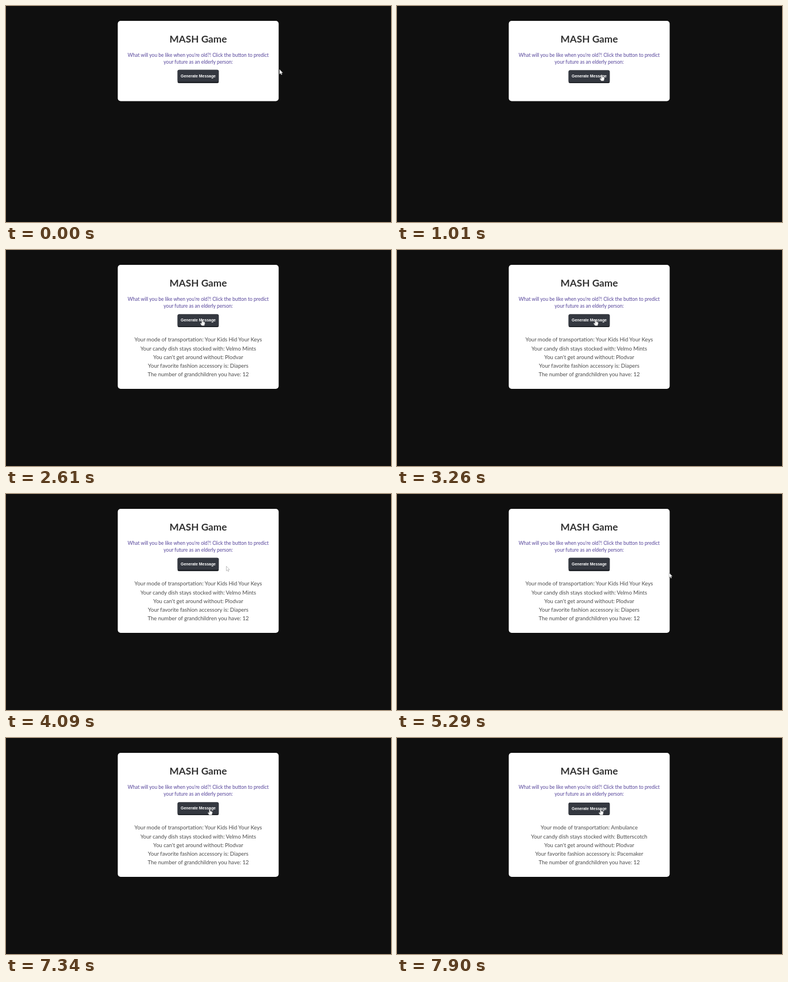
Write an HTML page that moves like this. It is 670 px wide and 378 px high and loops after 8 s.

```html
<!DOCTYPE html>
<html lang="en">
<head>
<meta charset="utf-8">
<title>MASH Game</title>
<style>
  html, body { margin: 0; width: 100%; height: 100%; overflow: hidden; background: #0f0f0f; }
  svg { display: block; width: 100vw; height: 100vh; }
  text { text-anchor: middle; font-family: Lato, "Open Sans", sans-serif; }
  .title { font-size: 17.2px; font-weight: 700; fill: #333; }
  .intro { font-size: 8.53px; fill: #55449a; }
  .result { font-size: 9.5px; fill: #4c4c4c; }
  .label { font: 700 6.9px "Liberation Sans", Arial, sans-serif; fill: #fff; }
  .pointer { fill: #fff; stroke: #999; stroke-width: .6; stroke-linejoin: round; }
</style>
</head>
<body>
<svg viewBox="0 0 670 378">
  <rect id="card" x="194.5" y="26" width="280" rx="5" fill="#fff"/>
  <text class="title" x="334.5" y="64.4">MASH Game</text>
  <text class="intro" x="334.5" y="89.4">What will you be like when you're old?! Click the button to predict</text>
  <text class="intro" x="334.5" y="101">your future as an elderly person:</text>
  <rect id="edge" x="298.6" width="71.6" rx="2.5" fill="#212429"/>
  <rect id="face" x="298.6" width="71.6" rx="2.5" fill="#343840"/>
  <text id="label" class="label" x="334.5">Generate Message</text>
  <g id="results"></g>
  <path id="arrow" class="pointer" d="M0 0V8.2L1.9 6.5 3.1 9.3 4.4 8.7 3.2 6H5.6Z"/>
  <path id="hand" class="pointer" d="M-.8.8Q0-.5.8.8V4L3.6 4.7Q4.8 5 4.7 6.2L4.2 8.6 3.5 10.8H-.8L-3 7.4Q-3.3 6.2-2.2 6.3L-.8 7.4Z"/>
</svg>
<script>
const LOOP = 8000;
const BUTTON = { left: 298.6, right: 370.2, top: 111.8, bottom: 135 };

const START = { x: 476, y: 111 };
const MOVES = [
  { from: 30, to: 1290, x: 339, y: 121.5 },
  { from: 2430, to: 2860, x: 345.5, y: 121.5 },
  { from: 3990, to: 4270, x: 473.5, y: 138 },
  { from: 5390, to: 6990, x: 354.5, y: 124 }
];

const FIRST_CLICK = 2500, SECOND_CLICK = 7600, THIRD_CLICK = 7900;
const CLICKS = [FIRST_CLICK, SECOND_CLICK, THIRD_CLICK];
const CLICK_MS = 80;

const message = (ride, candy, accessory) => [
  `Your mode of transportation: ${ride}`,
  `Your candy dish stays stocked with: ${candy}`,
  "You can't get around without: Plodvar",
  `Your favorite fashion accessory is: ${accessory}`,
  "The number of grandchildren you have: 12"
];
const FIRST = message("Your Kids Hid Your Keys", "Velmo Mints", "Diapers");
const SECOND = message("Ambulance", "Butterscotch", "Pacemaker");

const el = id => document.getElementById(id);
const set = (id, attrs) => {
  for (const key in attrs) el(id).setAttribute(key, attrs[key]);
};
const clamp = v => Math.min(1, Math.max(0, v));
const ease = p => p * p * (3 - 2 * p);

function cursorAt(t) {
  return MOVES.reduce((pos, move) => {
    const p = ease(clamp((t - move.from) / (move.to - move.from)));
    return { x: pos.x + (move.x - pos.x) * p, y: pos.y + (move.y - pos.y) * p };
  }, START);
}

const isOver = ({ x, y }) =>
  x > BUTTON.left && x < BUTTON.right && y > BUTTON.top && y < BUTTON.bottom;

const clickDepth = t =>
  Math.max(...CLICKS.map(click => clamp(1 - Math.abs(t - click) / CLICK_MS)));

function linesAt(t) {
  if (t < FIRST_CLICK) return null;
  return t < SECOND_CLICK ? FIRST : SECOND;
}

let shown;
function showLines(lines) {
  if (lines === shown) return;
  shown = lines;
  set("card", { height: lines ? 217 : 140.5 });
  el("results").innerHTML = (lines || []).map((line, i) =>
    `<text class="result" x="334.5" y="${160.2 + i * 15.3}">${line}</text>`).join("");
}

function draw(t) {
  showLines(linesAt(t));

  const cursor = cursorAt(t);
  const over = isOver(cursor);
  const depth = (over ? 1 : 0) + clickDepth(t);
  const top = BUTTON.top + depth * 0.65;
  set("face", { y: top, height: 20.4 + depth * 0.2 });
  set("edge", { y: top, height: BUTTON.bottom - top });
  set("label", { y: 124.5 + depth * 0.65 });

  const transform = `translate(${cursor.x} ${cursor.y})`;
  set("arrow", { transform, visibility: over ? "hidden" : "visible" });
  set("hand", { transform, visibility: over ? "visible" : "hidden" });
}

const start = performance.now();
function tick() {
  draw((performance.now() - start) % LOOP);
  requestAnimationFrame(tick);
}
tick();
</script>
</body>
</html>
```
